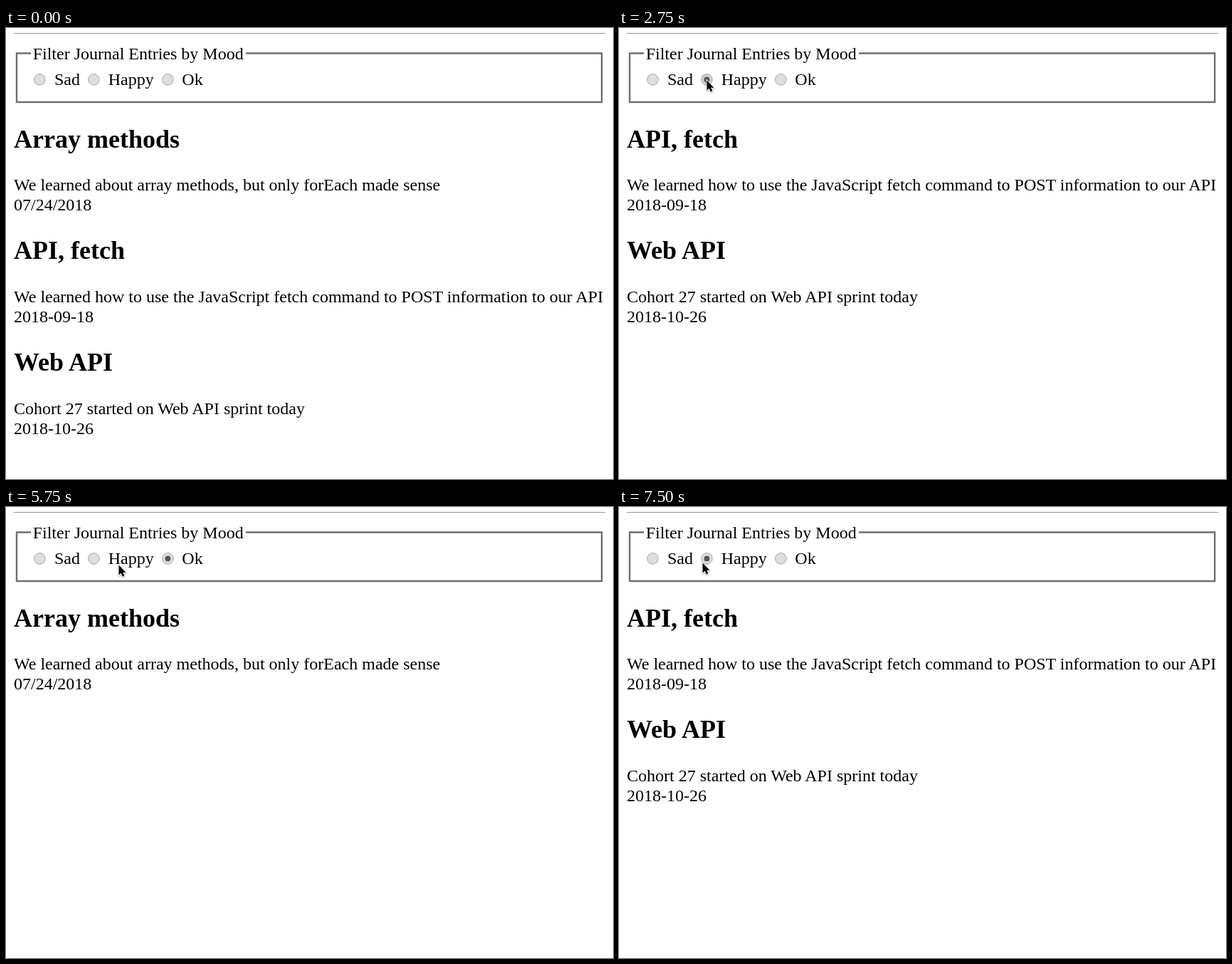
An HTML page that plays this animation: 853 px wide and 633 px high, repeating every 8 s.

```html
<!DOCTYPE html>
<html lang="en">
<head>
<meta charset="utf-8">
<title>Journal entries by mood</title>
<style>
  html, body { margin: 0; width: 100%; height: 100%; overflow: hidden; background: #fff; }
  svg { display: block; width: 853px; height: 633px; }
  text { font: 24px "Liberation Serif", "Times New Roman", serif; fill: #000; }
  .title { font-size: 36px; font-weight: bold; }

  .ring { fill: #dedede; stroke: #a6a6a6; }
  .dot { fill: #555; }
  .all, .happy, .ok, .ring, .dot, #pointer { animation: 8s step-end infinite; }
  .all { animation-name: all; }
  .happy { animation-name: happy; }
  .ok { animation-name: ok; }
  #happy .ring { animation-name: press-happy; }
  #happy .dot { animation-name: check-happy; }
  #ok .ring { animation-name: press-ok; }
  #ok .dot { animation-name: ok; }
  #sad .dot { display: none; }
  #pointer { animation-name: move; filter: drop-shadow(0 1px 1px rgba(0, 0, 0, .35)); }

  @keyframes all { 0% { opacity: 1 } 34.375%, 100% { opacity: 0 } }
  @keyframes happy { 0%, 59.375% { opacity: 0 } 34.375%, 87.5%, 100% { opacity: 1 } }
  @keyframes ok { 0%, 87.5%, 100% { opacity: 0 } 59.375% { opacity: 1 } }
  @keyframes check-happy { 0%, 59.375% { opacity: 0 } 31.25%, 87.5%, 100% { opacity: 1 } }
  @keyframes press-happy { 0%, 56.25%, 87.5%, 100% { fill: #dedede } 31.25%, 81.25% { fill: #d0d0d0 } }
  @keyframes press-ok { 0%, 59.375%, 100% { fill: #dedede } 56.25% { fill: #d0d0d0 } }
  @keyframes move {
    0% { opacity: 0; transform: translate(79px, 51px) }
    9.375% { opacity: 1; transform: translate(79px, 51px) }
    12.5% { transform: translate(71px, 55px) }
    15.625% { transform: translate(102px, 76px) }
    18.75% { transform: translate(104px, 74px) }
    21.875% { transform: translate(126px, 73px) }
    25% { transform: translate(126px, 72px) }
    28.125% { transform: translate(122px, 72px) }
    40.625% { transform: translate(142px, 72px) }
    43.75% { transform: translate(182px, 72px) }
    46.875% { transform: translate(217px, 79px) }
    50% { transform: translate(220px, 79px) }
    68.75% { transform: translate(201px, 79px) }
    71.875% { transform: translate(157px, 80px) }
    75% { transform: translate(126px, 80px) }
    78.125% { transform: translate(118px, 77px) }
    81.25%, 100% { opacity: 1; transform: translate(116px, 77px) }
  }
</style>
</head>
<body>
<svg viewBox="0 0 853 633">
  <path d="M11 7.5H842" stroke="#9a9a9a"/>
  <path d="M11 9H842" stroke="#eee"/>
  <path d="M35 35.5H15V104H837.2V35.5H337" fill="none" stroke="#6f6f6f" stroke-width="2.4"/>
  <text x="37.7" y="44">Filter Journal Entries by Mood</text>
  <g id="radios"></g>
  <g id="entries"></g>
  <g id="pointer">
    <path d="M1.5 1.5V15.6L4.7 12.7L6.8 17.5L9.3 16.4L7.2 11.8H11.4Z" fill="#000" stroke="#fff" stroke-width="1.6" paint-order="stroke"/>
  </g>
</svg>
<script>
  const moods = [["sad", "Sad", 47.4, 68], ["happy", "Happy", 123.4, 143.7], ["ok", "Ok", 227.4, 247.3]];
  const journal = [
    ["Array methods", "We learned about array methods, but only forEach made sense", "07/24/2018"],
    ["API, fetch", "We learned how to use the JavaScript fetch command to POST information to our API", "2018-09-18"],
    ["Web API", "Cohort 27 started on Web API sprint today", "2018-10-26"]
  ];
  const titleY = [168, 324, 481];

  const radio = ([id, label, cx, x]) => `
    <g id="${id}">
      <circle class="ring" cx="${cx}" cy="72.4" r="7.8"/>
      <circle class="dot" cx="${cx}" cy="72.4" r="3.9"/>
    </g>
    <text x="${x}" y="80">${label}</text>`;

  const entry = ([title, body, date], slot) => {
    const bodyY = 228 + 157 * slot;
    return `
      <text class="title" x="11" y="${titleY[slot]}">${title}</text>
      <text x="11" y="${bodyY}">${body}</text>
      <text x="11" y="${bodyY + 28}">${date}</text>`;
  };

  const view = (name, list) => `<g class="${name}">${list.map(entry).join("")}</g>`;

  document.getElementById("radios").innerHTML = moods.map(radio).join("");
  document.getElementById("entries").innerHTML =
    view("all", journal) + view("happy", journal.slice(1)) + view("ok", journal.slice(0, 1));
</script>
</body>
</html>
```
